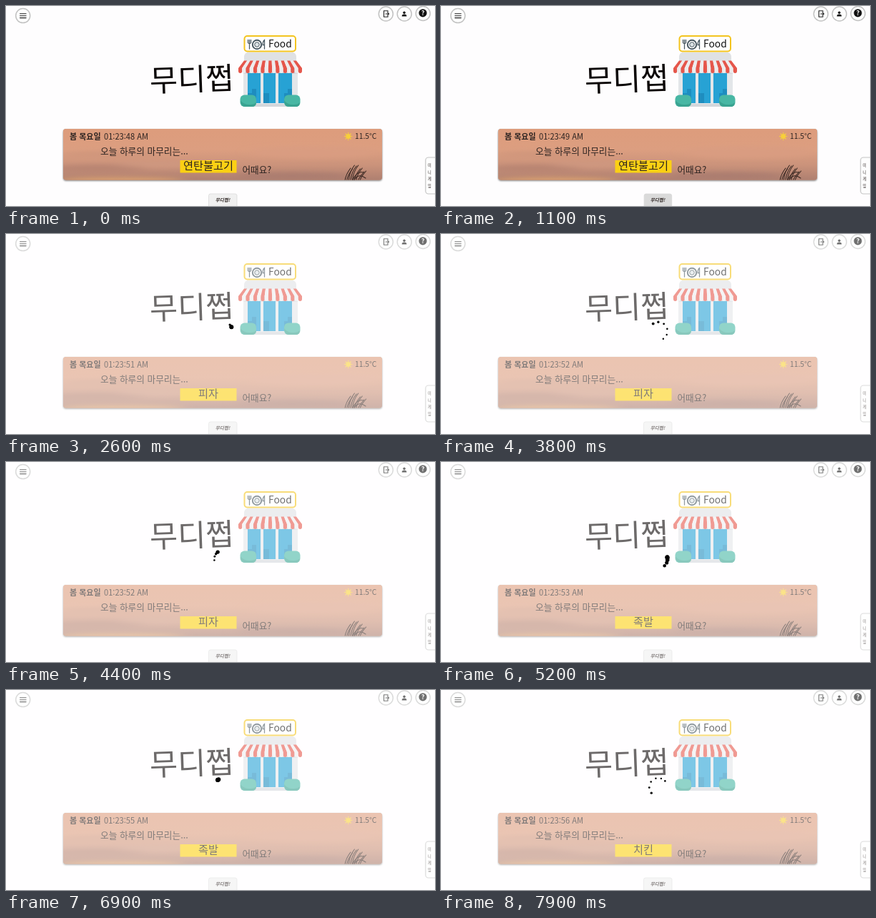
These frames come from a looping animation (600 by 280 pixels, 8000 ms). An HTML page:

```html
<!DOCTYPE html>
<html lang="ko">
<head>
<meta charset="utf-8">
<title>무디쩝</title>
<style>
  html, body { margin: 0; width: 100%; height: 100%; overflow: hidden; background: #fefdfe; }
  svg { display: block; width: 600px; height: 280px; }
  text { font-family: "Noto Sans CJK KR", "Noto Sans CJK", sans-serif; fill: #2b2220; }
  .mid { text-anchor: middle; }
  .round { fill: #fefefe; stroke: #c2c2c2; stroke-width: 1.5; }
  .line { fill: none; stroke: #222; stroke-linecap: round; }
</style>
</head>
<body>
<svg viewBox="0 0 600 280">
  <defs>
    <linearGradient id="sky" x1="0" y1="0" x2="0" y2="1">
      <stop offset="0" stop-color="#dd9c7c"/>
      <stop offset=".4" stop-color="#dc9e80"/>
      <stop offset=".7" stop-color="#cb937b"/>
      <stop offset="1" stop-color="#ae7f70"/>
    </linearGradient>
    <filter id="soft" x="-50%" y="-100%" width="200%" height="300%"><feGaussianBlur stdDeviation="9 3"/></filter>
    <filter id="drop" x="-10%" y="-20%" width="120%" height="150%">
      <feDropShadow dx="0" dy="1.2" stdDeviation=".8" flood-opacity=".55"/>
    </filter>
    <clipPath id="card"><rect x="80" y="172" width="446" height="71.5" rx="4"/></clipPath>
  </defs>
  <rect width="600" height="280" fill="#fefdfe"/>

  <!-- corner buttons -->
  <circle class="round" cx="23.7" cy="13.6" r="10"/>
  <circle class="round" cx="531.3" cy="11" r="10"/>
  <circle class="round" cx="557.2" cy="11" r="10"/>
  <circle class="round" cx="583.2" cy="10.5" r="10"/>
  <path class="line" stroke-width="1.1" d="M19.5 10.8h8.600M19.5 13.700h8.600M19.5 16.600h8.600"/>
  <path class="line" stroke-width="1.1" d="M534 8.800v-2h-5.500v8.400h5.500v-2M531 11h4.500M533.800 9.300l1.800 1.700-1.800 1.700"/>
  <circle cx="557" cy="9.200" r="1.700" fill="#111"/>
  <path d="M553.700 14.500v-.8c0-2.800 6.600-2.800 6.600 0v.8z" fill="#111"/>
  <circle cx="583" cy="9.800" r="5.600" fill="#111"/>
  <text class="mid" x="583" y="13.200" font-size="9" font-weight="700" style="fill:#fff">?</text>

  <!-- title -->
  <text x="201" y="118" font-size="42.500" font-weight="500" transform="rotate(-2 260 102)" style="fill:#0b0606">무디쩝</text>

  <!-- shop -->
  <path d="M337 65h65q4 2 4 6v8h-73v-8q0-4 4-6z" fill="#dfe1e4"/>
  <rect x="332" y="84" width="76" height="54" fill="#e3e6e9"/>
  <rect x="332" y="88" width="76" height="6.500" fill="#c9ced4"/>
  <g fill="#27a2d4">
    <rect x="338" y="94" width="18" height="42"/>
    <rect x="360" y="94" width="17" height="42"/>
    <rect x="381" y="94" width="19" height="42"/>
  </g>
  <path d="M338 122h6v-6h6v20h-12zM360 122h8v14h-8zM389 136v-14h5v-6h6v20z" fill="#1e8dbf"/>
  <rect x="332" y="137" width="76" height="4" fill="#d3d7db"/>
  <g id="awning"></g>
  <g fill="#48b7a4">
    <rect x="327.500" y="124.500" width="22.500" height="16.500" rx="6"/>
    <rect x="389" y="124.500" width="22.500" height="16.500" rx="6"/>
  </g>
  <path d="M328 132q0 9 7 9h9q6 0 6-6-3 3-9 3-9 0-13-6zM389 132q0 9 7 9h9q6 0 6-6-3 3-9 3-9 0-13-6z" fill="#3aa391"/>
  <rect x="333.500" y="42" width="71.500" height="21.500" rx="4" fill="#fff" stroke="#f3c41f" stroke-width="2"/>
  <circle cx="351" cy="54" r="6.200" fill="#fff" stroke="#4a5a62" stroke-width="2"/>
  <circle cx="351" cy="54" r="3.300" fill="#dbe2e5" stroke="#4a5a62" stroke-width="1"/>
  <path class="line" style="stroke:#4a5a62" stroke-width="1.300" d="M338.500 47.500v4q2 3 4 0v-4M340.500 47.500v12.500M361.500 60v-12.500q-2.500 2-2.300 7h2"/>
  <text x="367" y="58.300" font-size="13.800" style="fill:#111">Food</text>

  <!-- weather card -->
  <rect x="80" y="172" width="446" height="71.500" rx="4" fill="#b58672" filter="url(#drop)"/>
  <g clip-path="url(#card)">
    <rect x="80" y="172" width="446" height="72" fill="url(#sky)"/>
    <g filter="url(#soft)">
      <ellipse cx="150" cy="208" rx="70" ry="5" fill="#d0967c"/>
      <ellipse cx="430" cy="205" rx="90" ry="8" fill="#d99c81"/>
      <ellipse cx="130" cy="228" rx="65" ry="6" fill="#b98572"/>
      <ellipse cx="215" cy="222" rx="60" ry="4" fill="#cf9880"/>
      <ellipse cx="160" cy="244" rx="90" ry="4" fill="#dda270"/>
      <ellipse cx="400" cy="238" rx="80" ry="5" fill="#ab7d6f"/>
    </g>
    <g id="grass" class="line" style="stroke:#3a2822" stroke-width="1.100"></g>
  </g>
  <text x="89" y="186.700" font-size="11" font-weight="700">봄 목요일</text>
  <text id="clock" x="137" y="186.700" font-size="11.100"></text>
  <g id="sun" stroke="#f7cf3a" stroke-width="1.300" stroke-linecap="round"><circle cx="478.700" cy="182.500" r="2.800" fill="#f7cf3a"/></g>
  <text x="488" y="186.300" font-size="10.300">11.5°C</text>
  <text x="132" y="207.500" font-size="12.700">오늘 하루의 마무리는...</text>
  <rect x="243.500" y="216" width="79" height="17.500" fill="#fbd014"/>
  <text id="food" class="mid" x="283" y="229.300" font-size="15.200" font-weight="500"></text>
  <text x="330.500" y="233.500" font-size="12.600">어때요?</text>

  <!-- side tab and bottom button -->
  <rect x="586.800" y="212" width="18" height="51" rx="4" fill="#fdfdfd" stroke="#c4c4c4" stroke-width="1.200"/>
  <g id="tab"></g>
  <rect id="button" y="263" height="22" rx="2.500" stroke="#d6d6d6" stroke-width=".7"/>
  <text class="mid" x="303" y="273.800" font-size="6.500" font-weight="700" font-style="italic">무디쩝!</text>

  <g id="loading">
    <rect width="600" height="280" fill="#fff" opacity=".4"/>
    <g id="dots"></g>
  </g>
</svg>
<script>
  const LOOP = 8000, LOAD_AT = 1850, HOVER_AT = 1000;
  const FOODS = [[0, "연탄불고기"], [1500, "피자"], [4500, "족발"], [7500, "치킨"]];
  const CENTER = [304, 136], SIZE = 24;
  const $ = id => document.getElementById(id);

  function add(parent, tag, attrs, text = "") {
    const el = document.createElementNS("http://www.w3.org/2000/svg", tag);
    for (const key in attrs) el.setAttribute(key, attrs[key]);
    el.textContent = text;
    return $(parent).appendChild(el);
  }

  // Striped awning with rounded ends
  const STRIPES = 17;
  for (let i = 0; i < STRIPES; i++) {
    const top = k => 333 + k * 73 / STRIPES, low = k => 325 + k * 89 / STRIPES;
    const a = low(i), b = low(i + 1);
    add("awning", "path", {
      d: `M${top(i)} 76.5H${top(i + 1)}L${b} 87V91Q${b} 94 ${(a + b) / 2} 94Q${a} 94 ${a} 91V87Z`,
      fill: i % 2 ? "#eeeced" : "#e5564b"
    });
  }

  // Reeds fanning upward from the lower edge
  for (let i = 0; i < 9; i++) {
    const base = 474 + i * 2.6, tip = 482 + i * 2.7;
    const height = 221 + Math.abs(i - 3) * 2 + i % 2 * 3;
    add("grass", "path", { d: `M${base} 245Q${base + 1} ${height + 9} ${tip} ${height}` });
  }
  add("grass", "path", { d: "M486 245Q492 233 503 241M484 245Q491 230 500 233" });

  for (let i = 0; i < 8; i++) {
    const c = Math.cos(i * Math.PI / 4), s = Math.sin(i * Math.PI / 4);
    add("sun", "path", { d: `M${478.7 + c * 4.3} ${182.5 + s * 4.3}L${478.7 + c * 5} ${182.5 + s * 5}` });
  }

  [..."미니게임"].forEach((ch, i) =>
    add("tab", "text", { class: "mid", x: 592.5, y: 225 + i * 9.6, "font-size": 5.2 }, ch));

  const dots = Array.from({ length: 6 }, () => add("dots", "circle", { fill: "#000" }));

  // cubic-bezier(.42, 0, .58, 1)
  function easeInOut(x) {
    let lo = 0, hi = 1;
    for (let i = 0; i < 24; i++) {
      const u = (lo + hi) / 2, v = 1 - u;
      if (1.26 * u * v * v + 1.74 * u * u * v + u * u * u < x) lo = u; else hi = u;
    }
    return lo * lo * (3 - 2 * lo);
  }

  function drawDots(s) {
    const radius = SIZE * 0.375 * Math.SQRT2;
    dots.forEach((dot, i) => {
      const own = (s + 1.1 - i * 0.1) % 2;
      const turns = s / 2.5 + easeInOut(Math.min(own / 1.6, 1));
      const angle = turns * 2 * Math.PI - Math.PI * 0.75;
      const shrink = own < 1 ? easeInOut(own) : 1 - easeInOut(own - 1);
      dot.setAttribute("cx", CENTER[0] + radius * Math.cos(angle));
      dot.setAttribute("cy", CENTER[1] + radius * Math.sin(angle));
      dot.setAttribute("r", SIZE / 8 * (1 - 0.6 * shrink));
    });
  }

  function drawButton(hover) {
    const grey = Math.round(240 - 64 * hover);
    $("button").setAttribute("fill", `rgb(${grey},${grey},${grey})`);
    $("button").setAttribute("x", 283.5 + 2 * hover);
    $("button").setAttribute("width", 39.5 - 3 * hover);
  }

  function render(t) {
    const loading = t >= LOAD_AT;
    $("clock").textContent = `01:23:${48 + Math.floor((t + 500) / 1000)} AM`;
    $("food").textContent = FOODS.filter(([at]) => at <= t).pop()[1];
    drawButton(loading ? 0 : easeInOut(Math.min(Math.max((t - HOVER_AT) / 250, 0), 1)));
    $("loading").style.display = loading ? "" : "none";
    if (loading) drawDots((t - LOAD_AT) / 1000);
  }

  const start = performance.now();
  function tick() {
    render((performance.now() - start) % LOOP);
    requestAnimationFrame(tick);
  }
  tick();
</script>
</body>
</html>
```
